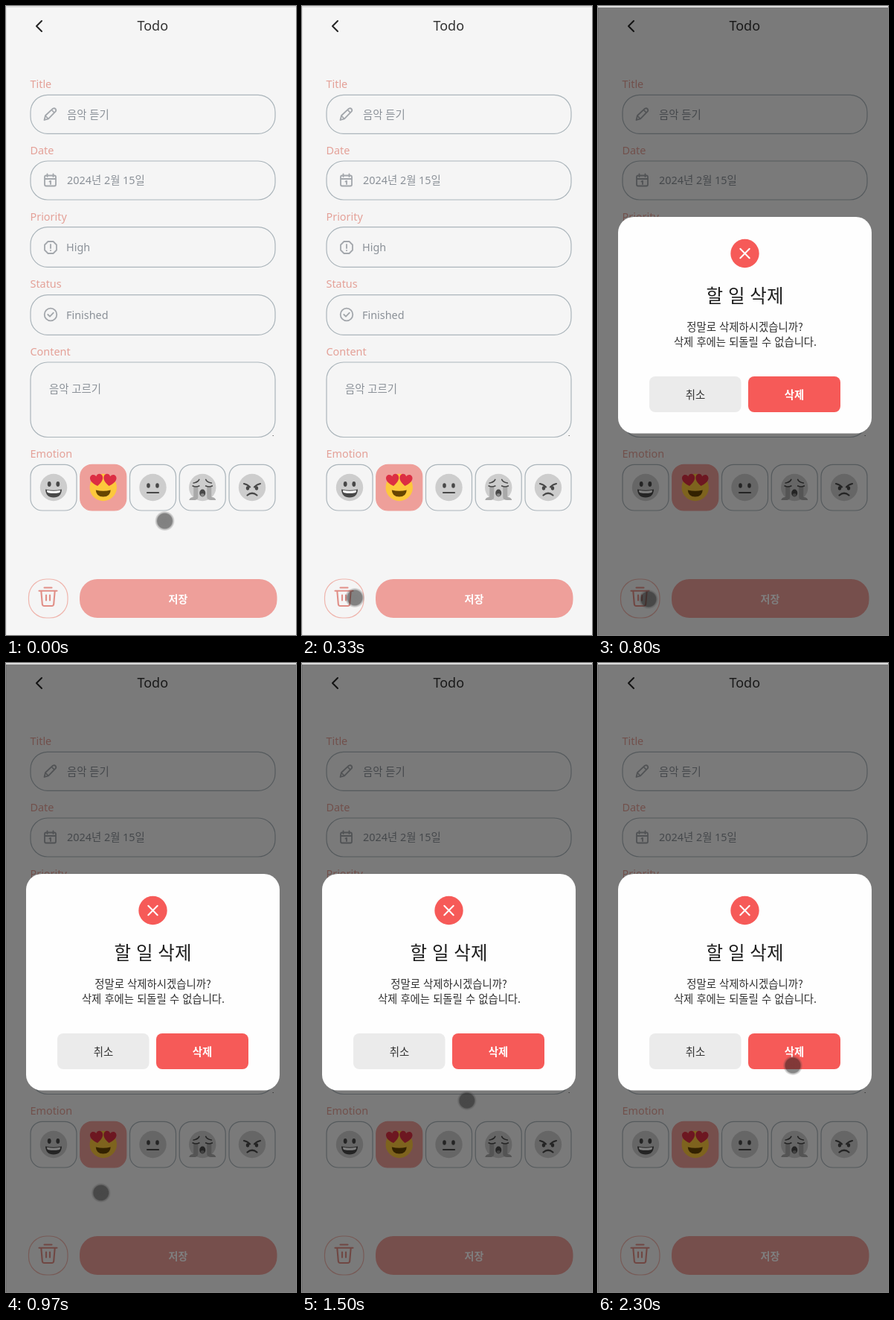
An HTML page for the animation above (2.33 s loop, 390 by 844 pixels).

```html
<!DOCTYPE html>
<html lang="ko">
<head>
<meta charset="utf-8">
<title>Todo</title>
<style>
html, body { margin: 0; width: 100%; height: 100%; overflow: hidden; background: #f5f5f5; }
svg { display: block; width: 390px; height: 844px; }
text { font: 500 14.4px "Noto Sans", "Noto Sans CJK KR", "Noto Sans CJK JP", "Noto Sans CJK", sans-serif; }
.ko { font-family: "Noto Sans CJK KR", "Noto Sans CJK JP", "Noto Sans CJK", sans-serif; text-anchor: middle; }
.label { fill: #e4a198; }
.value { fill: #8b9198; }
.box { fill: none; stroke: #abb5bb; stroke-width: 1.2; }
.icon { fill: none; stroke: #a3a7ac; stroke-width: 1.8; stroke-linecap: round; stroke-linejoin: round; }
.line { fill: none; stroke: #484848; stroke-width: 2.2; stroke-linecap: round; stroke-linejoin: round; }
.dark { fill: #484848; }
</style>
</head>
<body>
<svg viewBox="0 0 390 844">
  <defs>
    <radialGradient id="dot">
      <stop offset="0" stop-color="#1c1c1c" stop-opacity=".54"/>
      <stop offset=".76" stop-color="#1c1c1c" stop-opacity=".53"/>
      <stop offset=".86" stop-color="#3a3a3a" stop-opacity=".3"/>
      <stop offset="1" stop-color="#505050" stop-opacity=".12"/>
    </radialGradient>
    <path id="heart" d="M0 8C-5 5-9 1-8.6-3.4C-8-8.4-2-9.2 0-4.8C2-9.2 8-8.4 8.6-3.4C9 1 5 5 0 8Z" fill="#dc2e43"/>
  </defs>
  <rect width="390" height="844" fill="#f5f5f5"/>
  <path d="M.5 2V844" stroke="#e3e3e3"/>
  <path d="M48 20L41 27L48 34" fill="none" stroke="#252525" stroke-width="2" stroke-linecap="round" stroke-linejoin="round"/>
  <text x="197.3" y="33.4" text-anchor="middle" fill="#333" style="font-size:18px;font-weight:400">Todo</text>

  <g id="form"></g>

  <g class="icon">
    <path d="M51.5 153L53 147L63 137.7Q65 136.500 66.700 138.200Q68 140 66.500 141.700L57 151.300ZM61.500 139.500L64.800 143M53.200 147.500L56.500 151"/>
    <path d="M54 227.500H65Q67 227.500 67 229.500V239.500Q67 241.500 65 241.500H54Q52 241.500 52 239.500V229.500Q52 227.500 54 227.500ZM52 232H67M55.500 225.500V229M63.500 225.500V229M58.500 235.500L60 234.800V239"/>
    <path d="M56.500 316H63.500L68 320.500V327.500L63.500 332H56.500L52 327.500V320.500ZM60 320V325M60 328V328.200"/>
    <circle cx="60" cy="414" r="8.300"/>
    <path d="M56.300 414L59 416.700L63.800 411.600"/>
  </g>
  <path d="M358.500 576.500h1.500" stroke="#777"/>

  <g id="tiles"></g>
  <g id="faces">
    <g>
      <ellipse class="dark" cx="-5.800" cy="-4.500" rx="2.400" ry="3.400"/>
      <ellipse class="dark" cx="5.800" cy="-4.500" rx="2.400" ry="3.400"/>
      <path class="dark" d="M-11 2.500Q0 5 11 2.500Q10.500 13.500 0 13.500T-11 2.500Z"/>
      <path d="M-9 3.800Q0 5.500 9 3.800Q9 7 7 7.300Q0 8.400-7 7.300Q-9 7-9 3.800Z" fill="#fff"/>
    </g>
    <g>
      <use href="#heart" transform="translate(-8.800 -10) rotate(-8)"/>
      <use href="#heart" transform="translate(8.800 -10) rotate(8)"/>
      <path d="M-10 3.500Q0 6 10 3.500Q9.500 12.500 0 12.500T-10 3.500Z" fill="#664500"/>
    </g>
    <g>
      <ellipse class="dark" cx="-6" cy="-2.500" rx="2.300" ry="3.300"/>
      <ellipse class="dark" cx="6" cy="-2.500" rx="2.300" ry="3.300"/>
      <path class="line" d="M-7.500 7H7.500"/>
    </g>
    <g>
      <path d="M-12-1H-6V13Q-6 17-12 17H-18Q-17 13-12 13ZM12-1H6V13Q6 17 12 17H18Q17 13 12 13Z" fill="#a9a9a9"/>
      <path class="line" style="stroke-width:1.700" d="M-12-6Q-6-7-4.500-10.500M12-6Q6-7 4.500-10.500M-13-2Q-9 0-4.500-2M13-2Q9 0 4.500-2"/>
      <ellipse class="dark" cy="7.500" rx="4" ry="5"/>
      <ellipse cy="10" rx="2.500" ry="2" fill="#888"/>
    </g>
    <g>
      <path class="line" d="M-11-5Q-6-4-3-.5M11-5Q6-4 3-.5M-6.500 10.500Q0 5 6.500 10.500"/>
      <ellipse class="dark" cx="-6" cy="1" rx="2.200" ry="2.700"/>
      <ellipse class="dark" cx="6" cy="1" rx="2.200" ry="2.700"/>
    </g>
  </g>

  <rect x="30.500" y="769" width="52.500" height="52" rx="24" fill="none" stroke="#efb5ad" stroke-width="1.200"/>
  <path d="M44.500 784.800H68.500M51.500 780.500H61.500M47.300 785L48.800 802.500Q49 805 51.500 805H61.500Q64 805 64.200 802.500L65.700 785M54 790.500V797.500M59 790.500V797.500" fill="none" stroke="#e18f87" stroke-width="2.100" stroke-linecap="round"/>
  <rect x="99" y="769" width="265.500" height="52" rx="24" fill="#ee9f9a"/>
  <text class="ko" x="231.500" y="800.500" fill="#fff" style="font-size:14px;font-weight:700">저장</text>

  <rect id="shade" y="2" width="390" height="842" fill="#000" opacity=".5"/>
  <rect width="390" height="2" fill="#dedede"/>

  <g id="modal">
    <rect x="27" y="283" width="341" height="290.500" rx="21" fill="#fefefe"/>
    <circle cx="197.500" cy="332" r="19.200" fill="#f65a58"/>
    <path d="M191.300 325.800L203.700 338.200M203.700 325.800L191.300 338.200" stroke="#fff" stroke-width="2" stroke-linecap="round"/>
    <text class="ko" x="197.500" y="398" fill="#1d1d1d" style="font-size:24.500px">할 일 삭제</text>
    <g fill="#303030">
      <text class="ko" x="197.500" y="436" style="font-weight:400">정말로 삭제하시겠습니까?</text>
      <text class="ko" x="198" y="456" style="font-weight:400">삭제 후에는 되돌릴 수 없습니다.</text>
    </g>
    <rect x="69" y="497" width="123.500" height="48" rx="8" fill="#ebebeb"/>
    <rect x="202" y="497" width="124" height="48" rx="8" fill="#f65a58"/>
    <text class="ko" x="131" y="526.500" fill="#333">취소</text>
    <text class="ko" x="264" y="526.500" fill="#fff" style="font-weight:700">삭제</text>
  </g>
  <circle id="cursor" r="13" fill="url(#dot)"/>
</svg>
<script>
const $ = id => document.getElementById(id);
const LOOP = 2330, MODAL_AT = 800;

// label, label baseline, box top, box height, value, value x, value baseline
const fields = [
  ['Title', 110, 119.3, 52, '음악 듣기', 82, 150.5],
  ['Date', 199, 208, 52, '2024년 2월 15일', 82, 239.3],
  ['Priority', 288, 296.6, 53.700, 'High', 81, 329.3],
  ['Status', 377.5, 387.7, 53.700, 'Finished', 81, 420],
  ['Content', 469, 478, 100.5, '음악 고르기', 58, 518.5],
];
const label = (name, y) => `<text class="label" x="32.500" y="${y}">${name}</text>`;
$('form').innerHTML = fields.map(([name, labelY, top, height, value, x, y]) =>
  `${label(name, labelY)}<rect class="box" x="33" y="${top}" width="329" height="${height}" rx="23"/>
   <text class="value" x="${x}" y="${y}">${value}</text>`).join('') + label('Emotion', 606);

[...$('faces').children].forEach((face, i) => {
  const x = 33 + i * 66.75, chosen = i === 1;
  $('tiles').innerHTML += `<rect class="box" x="${x}" y="615.300" width="62" height="61.700" rx="16"
    ${chosen ? 'style="fill:#ee9f9a;stroke:#ee9f9a"' : ''}/>
    <circle cx="${x + 31}" cy="646" r="18.200" fill="${chosen ? '#fdc83c' : '#cdcdcd'}"/>`;
  face.setAttribute('transform', `translate(${x + 31} 646)`);
});

// time, x, y
const stops = [
  [0, 213.5, 691], [30, 213.5, 691], [330, 71, 794], [500, 68, 796],
  [MODAL_AT, 68, 796], [1130, 181, 635], [1270, 181, 635], [1730, 262, 540], [LOOP, 262, 540],
];
const ease = p => (1 - Math.cos(Math.PI * p)) / 2;

function cursorAt(t) {
  const i = stops.findIndex(s => s[0] > t);
  const [t0, x0, y0] = stops[i - 1], [t1, x1, y1] = stops[i];
  const p = ease((t - t0) / (t1 - t0));
  return [x0 + (x1 - x0) * p, y0 + (y1 - y0) * p];
}

function render(t) {
  const display = t >= MODAL_AT ? 'inline' : 'none';
  $('shade').style.display = $('modal').style.display = display;
  $('cursor').setAttribute('transform', `translate(${cursorAt(t)})`);
}

const start = performance.now();
function tick() {
  render((performance.now() - start) % LOOP);
  requestAnimationFrame(tick);
}
tick();
</script>
</body>
</html>
```
